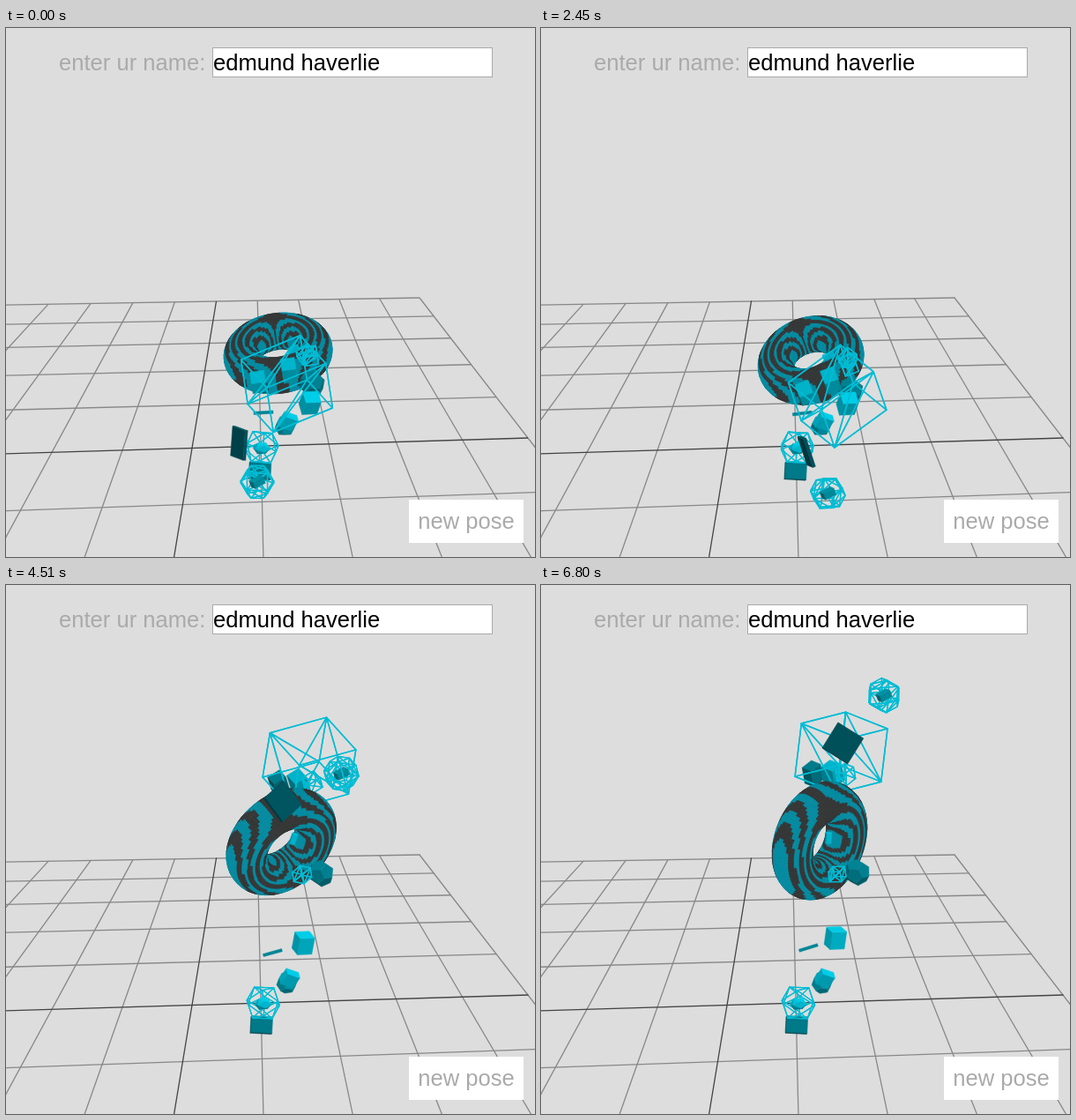
Recreate the animation shown at these times as an HTML page with a canvas. Size 600x600 px, loop 6870 ms.

```html
<!DOCTYPE html>
<html lang="en">
<head>
<meta charset="utf-8">
<title>new pose</title>
<style>
  html, body { margin: 0; width: 100%; height: 100%; overflow: hidden; background: #ddd; }
  #stage { position: relative; width: 600px; height: 600px; font: 25.6px/30px "Liberation Sans", Arial, sans-serif; color: #aaa; }
  canvas { position: absolute; left: 0; top: 0; }
  #stage div { position: absolute; box-sizing: border-box; white-space: pre; }
  #label { left: 60px; top: 24px; }
  #name { left: 234px; top: 22px; width: 318px; height: 34px; padding: 1px 0 0; background: #fff; border: 1px solid #a9a9a9; color: #000; }
  #pose { left: 457px; top: 535px; width: 130px; height: 49px; line-height: 49px; background: #fff; text-align: center; }
</style>
</head>
<body>
<div id="stage">
  <canvas id="view" width="600" height="600"></canvas>
  <div id="label">enter ur name:</div>
  <div id="name">edmund haverlie</div>
  <div id="pose">new pose</div>
</div>
<script>
const ctx = document.getElementById('view').getContext('2d');
const LOOP = 6870, STEPS = 87, PERIOD = 36.2;
const { sin, cos, PI, sqrt, floor, min } = Math;

// --- vectors ---
const dot = (a, b) => a[0] * b[0] + a[1] * b[1] + a[2] * b[2];
const sub = (a, b) => a.map((v, i) => v - b[i]);
const cross = (a, b) => [a[1] * b[2] - a[2] * b[1], a[2] * b[0] - a[0] * b[2], a[0] * b[1] - a[1] * b[0]];
const unit = a => { const l = sqrt(dot(a, a)) || 1; return a.map(v => v / l); };
const middle = ps => [0, 1, 2].map(i => ps.reduce((s, p) => s + p[i], 0) / ps.length);

// Turn by yaw, then pitch, then roll, in degrees (y points down, z to the viewer).
function turn(yaw, pitch, roll) {
  const [w, p, r] = [yaw, pitch, roll].map(d => d * PI / 180);
  const cw = cos(w), sw = sin(w), cp = cos(p), sp = sin(p), cr = cos(r), sr = sin(r);
  return ([x, y, z]) => {
    const x1 = x * cw + z * sw, z1 = z * cw - x * sw;
    const y2 = y * cp + z1 * sp, z2 = z1 * cp - y * sp;
    return [x1 * cr - y2 * sr, x1 * sr + y2 * cr, z2];
  };
}

// --- solids ---
const PHI = (1 + sqrt(5)) / 2;
const signs = p => p.reduce((out, v) => out.flatMap(q => (v ? [v, -v] : [0]).map(s => [...q, s])), [[]]);
const cycle = (a, b, c) => [[a, b, c], [c, a, b], [b, c, a]].flatMap(signs);
const corners = signs([1, 1, 1]);
const icoPoints = cycle(0, 1, PHI).map(unit);
const dodePoints = [...corners, ...cycle(0, PHI, 1 / PHI)].map(unit);

function hull(points, normals) {
  return normals.map(n => {
    const far = Math.max(...points.map(p => dot(p, n)));
    const face = points.filter(p => dot(p, n) > far - 1e-6);
    const c = middle(face), e1 = sub(face[0], c), e2 = cross(unit(n), e1);
    const angle = p => Math.atan2(dot(sub(p, c), e2), dot(sub(p, c), e1));
    return face.sort((a, b) => angle(a) - angle(b));
  });
}
const BOX = hull(corners, cycle(0, 0, 1));
const ICO = hull(icoPoints, dodePoints);
const DODE = hull(dodePoints, icoPoints);

// --- drawing helpers ---
const LIGHT = unit([0.3, -0.7, 0.6]);

function trace(points) {
  ctx.beginPath();
  points.forEach(p => ctx.lineTo(p[0], p[1]));
  ctx.closePath();
}

const place = (face, [x, y], size, rot) => face.map(p => {
  const q = rot(p.map((v, i) => v * size[i]));
  return [q[0] + x, q[1] + y, q[2]];
});

function wire(mesh, at, size, rot, width = 1.3) {
  ctx.strokeStyle = '#00bcd4';
  ctx.lineWidth = width;
  ctx.lineJoin = 'round';
  mesh.forEach(face => {
    const ps = place(face, at, size, rot);
    for (let i = 1; i < ps.length - 1; i++) {
      trace([ps[0], ps[i], ps[i + 1]]);
      ctx.stroke();
    }
  });
}

function solid(mesh, at, size, rot, tone = 1) {
  mesh.forEach(face => {
    const ps = place(face, at, size, rot), c = middle(ps);
    let n = unit(cross(sub(ps[1], ps[0]), sub(ps[2], ps[0])));
    if (dot(n, [c[0] - at[0], c[1] - at[1], c[2]]) < 0) n = n.map(v => -v);
    if (n[2] <= 0) return;
    const k = tone * (0.8 + 0.3 * dot(n, LIGHT));
    ctx.fillStyle = ctx.strokeStyle = `rgb(0,${188 * k},${212 * k})`;
    ctx.lineWidth = 0.5;
    trace(ps);
    ctx.fill();
    ctx.stroke();
  });
}

// --- floor ---
// Perspective floor: cell (i, j) to the stage.
function floorPoint(i, j) {
  const w = 1 + 0.00606 * i + 0.1338 * j;
  return [(79.79 * i + 37.41 * j + 211) / w, (0.518 * i + 8.18 * j + 476.5) / w];
}

function grid() {
  const line = (a, b, main) => {
    ctx.strokeStyle = main ? '#444' : '#888';
    ctx.lineWidth = 1.3;
    trace([floorPoint(...a), floorPoint(...b)]);
    ctx.stroke();
  };
  for (const main of [false, true])
    for (let k = -5; k <= 5; k++) {
      if (!k !== main) continue;
      line([k, -2.5], [k, 5], main);
      if (k > -3) line([-5, k], [5, k], main);
    }
}

// --- torso ---
const RING = 116, TUBE = 48, RADIUS = 46, THICK = 23;
const bands = [];
for (let i = 0; i < RING; i++)
  for (let j = 0; j < TUBE; j++) {
    const u = (i + 0.5) / RING * 2 * PI, v = (j + 0.5) / TUBE * 2 * PI;
    const bent = u + 0.3 * (1 - cos(v)) * cos(u);
    bands.push({ i, j, dark: cos(17 * cos(bent) * cos(v)) > 0 });
  }

function torus([x, y], rot, scale) {
  const mesh = [];
  for (let i = 0; i <= RING; i++)
    for (let j = 0; j <= TUBE; j++) {
      const u = i / RING * 2 * PI, v = j / TUBE * 2 * PI, d = RADIUS + THICK * cos(v);
      const q = rot([d * cos(u), -THICK * sin(v), d * sin(u)]);
      mesh.push([x + q[0] * scale, y + q[1] * scale, q[2]]);
    }
  const quads = [];
  for (const { i, j, dark } of bands) {
    const a = i * (TUBE + 1) + j, b = a + TUBE + 1;
    const ps = [mesh[a], mesh[b], mesh[b + 1], mesh[a + 1]];
    const area = (ps[2][0] - ps[0][0]) * (ps[3][1] - ps[1][1]) - (ps[2][1] - ps[0][1]) * (ps[3][0] - ps[1][0]);
    if (area > 0) quads.push({ ps, dark, z: ps[0][2] + ps[2][2] });
  }
  quads.sort((p, q) => p.z - q.z);
  ctx.lineWidth = 0.7;
  for (const { ps, dark } of quads) {
    ctx.fillStyle = ctx.strokeStyle = dark ? '#343636' : '#048aa0';
    trace(ps);
    ctx.fill();
    ctx.stroke();
  }
}

// --- figure ---
// c: depth of the crouch, s: progress of the loop, w: sideways sway from -1 to 1.
function poseAt(n) {
  const s = n / (STEPS - 1);
  return { n, s, c: 0.5 + 0.5 * cos(2 * PI * (n + 3) / PERIOD), w: -cos(1.15 * PI * s) };
}

const bodyTurn = ({ s, c }) => turn(
  45 * s * s * (1 - 0.7 * c),
  -50 + 100 * c * c + 13 * s * s,
  -3 - 66 * s * (1 - 0.6 * c) - 6 * c);

function torso({ c, w }, rot) {
  const dip = c ** 3;
  torus([310 + w * (7 - 11 * c) - 5 * c, 290 + 97 * dip], rot, 1 - 0.13 * dip);
}

function hips({ n, c, w }) {
  const dip = c ** 3;
  solid(DODE, [353 + 6 * w, 326 + 95 * dip], [15, 15, 15], turn(20 + n / 3, 20, 10), 0.66);
  wire(BOX, [328 + 9 * w + 24 * c * c, 328 + 52 * dip], [8, 6, 7], turn(25 + n / 2, 20 + 40 * c, -8));
  solid(BOX, [326, 287 + 95 * dip], [3, 6, 3], turn(10, 10, 4 + 70 * c));
}

function legs({ c, w }) {
  const drop = 4 * c ** 3, x = 290 + w;
  solid(BOX, [x - 1, 499 + drop], [12, 9.5, 6], turn(4, -4, 3), 0.64);
  wire(ICO, [x + 1, 474 + drop / 2], [21, 21, 21], turn(6 * w, 10 + 8 * c, 3), 1.2);
  solid(ICO, [x + 1, 475 + drop / 2], [10, 7, 9], turn(20, 10, 0));
  solid(DODE, [318 + w, 451], [12, 13, 12], turn(24, 30 + 25 * c, 20), 0.8);
  solid(BOX, [321 + w, 446], [8, 8, 5], turn(30, 30, 35));
  solid(BOX, [298 + 6 * w, 411 + 27 * c], [11, 1.6, 2], turn(0, 0, -13 - 5 * w + 5 * c), 0.72);
  solid(BOX, [331 + 3 * w + 18 * c, 400 + 27 * c], [9, 10.5, 8], turn(28, 20 + 30 * c, 8 + 12 * c));
}

function head({ c, w }, rot, tone) {
  const bow = c * c;
  solid(BOX, [299 + 10 * w + c * (6 + 9 * w), 214 + 215 * bow], [8, 7, 11], rot, tone);
  solid(BOX, [326 + 5 * w + c * (6 + 6 * w), 214 + 200 * bow], [8, 9, 11], rot, 0.9);
  wire(BOX, [345 + c * (6 + 6 * w), 215 + 180 * bow], [8, 7, 8], rot);
  wire(BOX, [333 + 8 * w + c * (10 + 17 * w), 190 + 245 * bow], [38, 32, 32], p => rot(turn(22, 0, 0)(p)), 1.5);
}

function plate({ s, c }) {
  solid(BOX, [242 + 100 * s + 24 * c, 174 + 318 * c], [17, 17, 1.6], turn(50 - 50 * s + 70 * c, 8, 4 - 62 * s), 0.43);
}

function globe({ n, c, w }) {
  const at = [340 + 55 * w, 118 + 425 * c];
  wire(DODE, at, [20, 20, 20], turn(n * 3, 25 + 60 * c, n));
  solid(BOX, at, [7, 4, 5], turn(20, 20, -20), 0.75);
}

function draw(n) {
  const pose = poseAt(n), rot = bodyTurn(pose);
  const standing = pose.c < 0.4, rising = !standing && pose.c < 0.8;
  ctx.clearRect(0, 0, 600, 600);
  grid();
  if (standing) { globe(pose); head(pose, rot, 0.62); }
  if (rising) plate(pose);
  torso(pose, rot);
  hips(pose);
  legs(pose);
  if (!standing) head(pose, rot, 0.9);
  if (!rising) plate(pose);
  if (!standing) globe(pose);
}

const start = performance.now();
let shown = -1;
function tick() {
  const t = (performance.now() - start) % LOOP;
  const n = min(STEPS - 1, floor(t / LOOP * STEPS + 0.12));
  if (n !== shown) draw(shown = n);
  requestAnimationFrame(tick);
}
tick();
</script>
</body>
</html>
```
